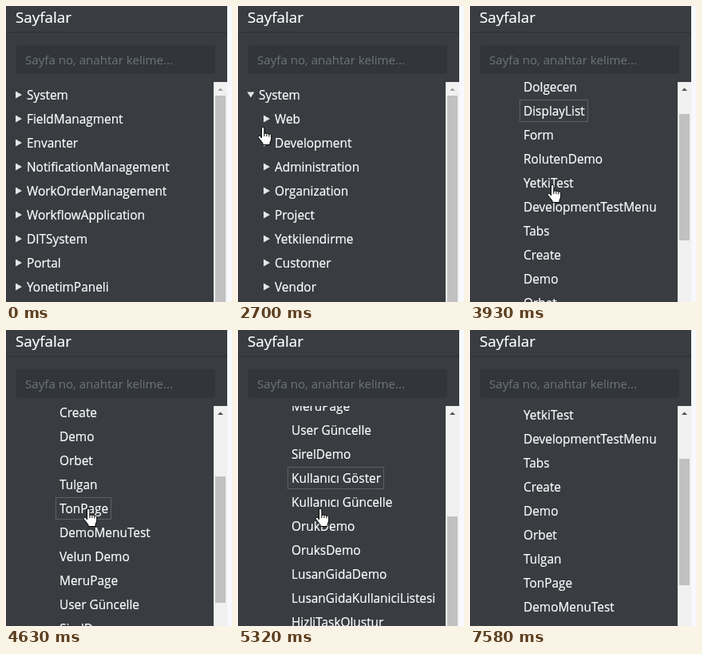
Write an HTML page that moves like this. It is 283 px wide and 370 px high and loops after 8.29 s.

```html
<!DOCTYPE html>
<html lang="tr">
<head>
<meta charset="utf-8">
<title>Sayfalar</title>
<style>
  html, body { margin: 0; width: 100%; height: 100%; overflow: hidden; background: #393c41; }
  svg { display: block; width: 100vw; height: 100vh; }
  text { font: 15.4px "Open Sans", "Noto Sans", sans-serif; fill: #fff; stroke: #fff; stroke-width: .2; }
  .title { font-size: 18.8px; }
  .hint { font-size: 15.1px; fill: #6c757d; stroke: none; }
</style>
</head>
<body>
<svg viewBox="0 0 283 370">
  <clipPath id="view"><rect y="95" width="260" height="275"/></clipPath>
  <rect width="283" height="370" fill="#393c41"/>
  <rect y="32" width="277" height="2" fill="#323539"/>
  <text class="title" x="12" y="21">Sayfalar</text>
  <rect x="12" y="49" width="250" height="36" rx="4" fill="#32353a"/>
  <text class="hint" x="24" y="73">Sayfa no, anahtar kelime...</text>
  <g clip-path="url(#view)">
    <g id="tree">
      <rect id="outline" height="27" fill="none" stroke="#5d6064"/>
    </g>
  </g>
  <rect x="260" y="95" width="17" height="275" fill="#f1f1f1"/>
  <path id="up" d="M265 106h7l-3.5-3.5z"/>
  <rect id="thumb" x="262" width="13" fill="#c1c1c1"/>
  <rect x="277" width="6" height="370" fill="#f8f9fd"/>
  <circle id="click" r="12" fill="#ff0" fill-opacity=".45"/>
  <g id="cursor" stroke="#000" stroke-linejoin="round">
    <path fill="#fff" d="M-3.5 13V1a1.7 1.7 0 0 1 3.4 0V8a1.6 1.6 0 0 1 3 .3a1.6 1.6 0 0 1 3 .6a1.5 1.5 0 0 1 2.8 .9V15L7 19V21.5H-2V19.5L-7.5 12.5a1.7 1.7 0 0 1 2.6-2Z"/>
    <path fill="none" d="M-.1 8v3M2.9 8.5v2.5M5.9 9v2.5"/>
  </g>
</svg>
<script>
const LOOP = 8290, STEP = 75, ROW = 30, TOP = 111;
const OPEN = 2240, EXPAND = 3310, RELOAD = 6650, SETTLE = 80;
const $ = id => document.getElementById(id);
const tree = $('tree'), outline = $('outline');

const roots = ['System', 'FieldManagment', 'Envanter', 'NotificationManagement', 'WorkOrderManagement',
  'WorkflowApplication', 'DITSystem', 'Portal', 'YonetimPaneli'];
const sections = ['Web', 'Development', 'Administration', 'Organization', 'Project',
  'Yetkilendirme', 'Customer', 'Vendor'];
const pages = ['Dolgecen', 'DisplayList', 'Form', 'RolutenDemo', 'YetkiTest', 'DevelopmentTestMenu', 'Tabs',
  'Create', 'Demo', 'Orbet', 'Tulgan', 'TonPage', 'DemoMenuTest', 'Velun Demo', 'MeruPage', 'User Güncelle',
  'SirelDemo', 'Kullanıcı Göster', 'Kullanıcı Güncelle', 'OrukDemo', 'OruksDemo', 'LusanGidaDemo',
  'LusanGidaKullaniciListesi', 'HizliTaskOlustur', 'TaskListesi', 'DemoForm'];

function add(parent, name, attrs, content = '') {
  const el = document.createElementNS('http://www.w3.org/2000/svg', name);
  set(el, attrs);
  el.textContent = content;
  return parent.appendChild(el);
}

function set(el, attrs) {
  for (const key in attrs) el.setAttribute(key, attrs[key]);
}

const arrow = (x, y, open) => open
  ? `M${x - .5} ${y - 3.5}h9l-4.5 7z`
  : `M${x} ${y - 4.5}l8 4.5l-8 4.5z`;

function addRow(parent, label, row, x, hasArrow = true) {
  const y = TOP + row * ROW;
  const text = add(parent, 'text', { x, y: y + 6 }, label);
  const mark = hasArrow && add(parent, 'path', { fill: '#e4e5e6' });
  const toggle = open => mark.setAttribute('d', arrow(x - 14, y, open));
  if (hasArrow) toggle(false);
  return { text, toggle, x, y };
}

const group = () => add(tree, 'g', {});
const system = addRow(tree, roots[0], 0, 26);
const rootGroup = group(), headGroup = group(), tailGroup = group(), pageGroup = group();
roots.slice(1).forEach((s, i) => addRow(rootGroup, s, i + 1, 26));
const development = sections.map((s, i) => addRow(i < 2 ? headGroup : tailGroup, s, i + 1, 46))[1];
const pageRows = pages.map((s, i) => addRow(pageGroup, s, i + 3, 67, false));

// Pointer: start, number of steps, target x and y
const moves = [
  [220, 8, 15, 115], [930, 5, 21, 105], [1780, 1, 16, 109], [2470, 7, 39, 169],
  [3540, 4, 105, 224], [5790, 3, 105, 198], [7200, 6, 222, 378]
];
// Wheel: start, distance, duration
const wheels = [[3780, 100, 225], [4080, 200, 291], [4630, 200, 291], [5240, 100, 362]];
const clicks = [1930, 3020, 6190, 6340];

const stepsSince = (t, start) => Math.floor((t - start) / STEP) + 1;
const smooth = u => u ** 3 / (u ** 3 + (1 - u) ** 3);

function pointer(t) {
  let x = 190, y = 385;
  for (const [start, count, tx, ty] of moves) {
    if (t < start) break;
    const u = Math.min(1, stepsSince(t, start) / count), k = u * (1.6 - .6 * u);
    x += (tx - x) * k;
    y += (ty - y) * k;
  }
  return [Math.round(x), Math.round(y)];
}

function scrollAt(t) {
  if (t >= RELOAD) return 215;
  let sum = 0;
  for (const [start, distance, ms] of wheels)
    if (t >= start) sum += distance * smooth(Math.min(1, stepsSince(t, start) * STEP / ms));
  return Math.round(sum);
}

// The outlined row is the one under the pointer, frozen while the list scrolls
function hoveredRow(t) {
  if (t < EXPAND || t >= RELOAD + 170) return;
  const wheel = wheels.find(([start, , ms]) => t >= start && t < start + ms + SETTLE);
  const at = wheel ? wheel[0] - 1 : t;
  const [x, y] = pointer(at);
  if (x > 62) return pageRows[Math.round((y + scrollAt(at) - TOP) / ROW) - 3];
}

const show = (el, on) => el.setAttribute('visibility', on ? 'visible' : 'hidden');

function draw(t) {
  const open = t >= OPEN, expanded = t >= EXPAND;
  const scroll = scrollAt(t), row = hoveredRow(t), [x, y] = pointer(t);

  show(rootGroup, !open);
  show(headGroup, open);
  show(tailGroup, open && !expanded);
  show(pageGroup, expanded);
  system.toggle(open);
  development.toggle(expanded);
  tree.setAttribute('transform', `translate(0 ${-scroll})`);

  show(outline, row);
  if (row) {
    const width = Math.round(row.text.getComputedTextLength()) + 8;
    set(outline, { x: row.x - 4.5, y: row.y - 13.5, width });
  }

  set($('thumb'), { y: Math.round(112 + scroll * .23), height: expanded ? 158 : 258 });
  set($('up'), { fill: scroll ? '#505050' : '#a3a3a3' });

  for (const id of ['cursor', 'click']) set($(id), { transform: `translate(${x} ${y})` });
  show($('cursor'), t >= 220 && t < 7580);
  show($('click'), clicks.some(at => t >= at && t < at + 80));
}

const begin = performance.now();
function tick() {
  draw((performance.now() - begin) % LOOP);
  requestAnimationFrame(tick);
}
tick();
</script>
</body>
</html>
```
